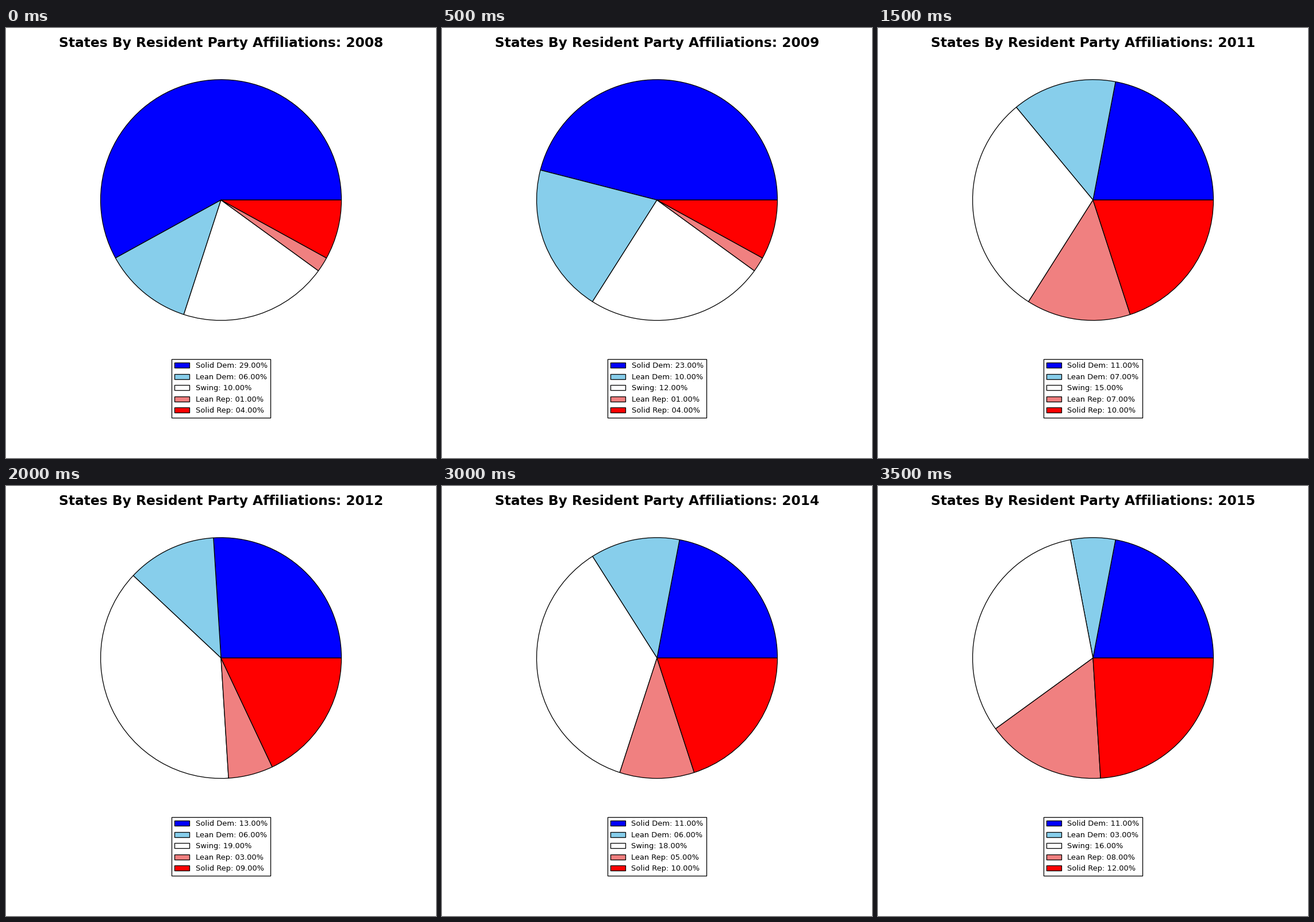
These frames come from a looping animation (748 px wide and 748 px high, 4 s). A matplotlib script:

```python
import matplotlib.pyplot as plt
from matplotlib.animation import FuncAnimation
from matplotlib.patches import Wedge

plt.rcParams["font.family"] = "DejaVu Sans"

FIRST_YEAR = 2008
LABELS = ["Solid Dem", "Lean Dem", "Swing", "Lean Rep", "Solid Rep"]
COLORS = ["blue", "skyblue", "white", "lightcoral", "red"]

# States per category, one row per year
COUNTS = [
    (29, 6, 10, 1, 4),
    (23, 10, 12, 1, 4),
    (13, 9, 18, 5, 5),
    (11, 7, 15, 7, 10),
    (13, 6, 19, 3, 9),
    (12, 5, 19, 2, 12),
    (11, 6, 18, 5, 10),
    (11, 3, 16, 8, 12),
]

fig = plt.figure(figsize=(8, 8), dpi=93.5, facecolor="white")
ax = fig.add_axes([0.15, 0.25, 0.7, 0.7])
ax.set(xlim=(-1.25, 1.25), ylim=(-1.25, 1.25), aspect="equal")
ax.axis("off")

title = fig.suptitle("", fontsize=18, fontweight="bold", y=0.98)


def caption(label, count):
    return f"{label}: {count:05.2f}%"


wedges = [
    ax.add_patch(Wedge((0, 0), 1, 0, 1, facecolor=color, edgecolor="black",
                       linewidth=1, label=caption(label, count)))
    for label, color, count in zip(LABELS, COLORS, COUNTS[0])
]

legend = ax.legend(
    handles=wedges, loc="upper center", fontsize=10,
    bbox_to_anchor=(0.5, 1 - 576.3 / 748), bbox_transform=fig.transFigure,
    borderaxespad=0, fancybox=False, framealpha=1, edgecolor="black",
)
legend.get_frame().set_linewidth(1)


def update(step):
    counts = COUNTS[step]
    title.set_text(f"States By Resident Party Affiliations: {FIRST_YEAR + step}")
    start = 0
    rows = zip(wedges, legend.get_texts(), LABELS, counts)
    for wedge, text, label, count in rows:
        end = start + 360 * count / sum(counts)
        wedge.set_theta1(start)
        wedge.set_theta2(end)
        text.set_text(caption(label, count))
        start = end
    return [title, legend, *wedges]


anim = FuncAnimation(fig, update, frames=len(COUNTS), interval=500,
                     repeat=True, repeat_delay=0, blit=False)
plt.show()
```
